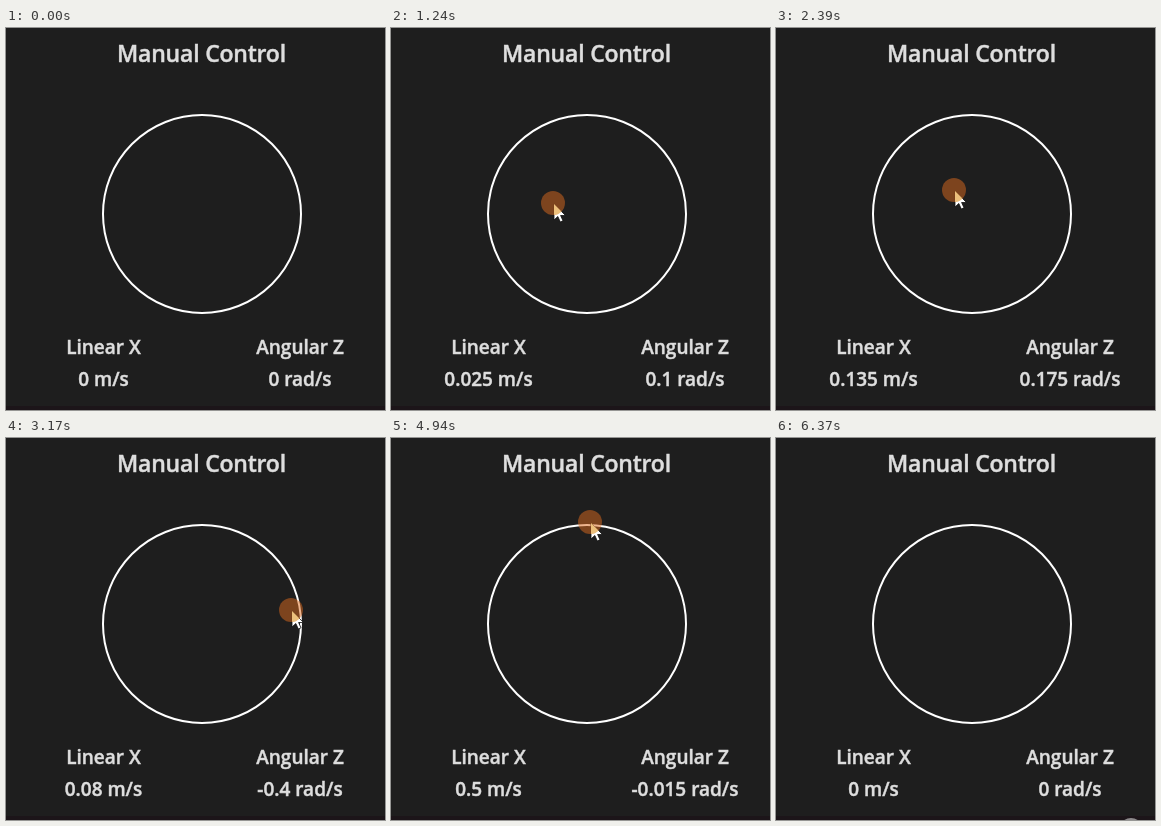
An HTML page for the animation above (6.4 s loop, 379 by 382 pixels).

```html
<!DOCTYPE html>
<html lang="en">
<head>
<meta charset="utf-8">
<title>Manual Control</title>
<style>
  html, body { margin: 0; width: 100%; height: 100%; overflow: hidden; background: #1e1e1e; }
  svg { display: block; }
  text {
    font: 600 19px "Open Sans", "Noto Sans", sans-serif;
    fill: #dedede; stroke: #dedede; stroke-width: .45px; text-anchor: middle;
  }
  .title { font-size: 23px; letter-spacing: -.2px; }
</style>
</head>
<body>
<svg width="379" height="382" viewBox="0 0 379 382">
  <defs>
    <clipPath id="inside"><circle r="12"/></clipPath>
    <path id="arrow" d="M1 1V17L4.8 13.5L7.3 19L10 17.8L7.6 12.5H12.5Z"/>
  </defs>
  <rect y="378" width="379" height="4" fill="#1c1519"/>
  <text class="title" x="195.5" y="34">Manual Control</text>
  <circle cx="196" cy="186" r="99" fill="none" stroke="#fff" stroke-width="2"/>
  <text x="97.5" y="326">Linear X</text>
  <text x="294" y="326">Angular Z</text>
  <text id="linear" x="97.5" y="358"></text>
  <text id="angular" x="294" y="358"></text>
  <g id="pointer">
    <use href="#arrow" fill="#fff" stroke="#111" stroke-width=".8"/>
    <circle id="dot" r="12"/>
    <path id="wedge" d="M0 0L6 -10.4A12 12 0 0 1 -3.1 11.6Z" fill="#7d441e"/>
    <use href="#arrow" fill="#ecc07c" clip-path="url(#inside)"/>
  </g>
</svg>
<script>
const LOOP = 6400, PERIOD = 380;
const CX = 196, CY = 186;
const ENTER = 30, PRESS = 760, RELEASE = 6050;
const PAUSE = 4100, RESUME = 4200;

// Turning points of the pointer: time, x, y
const path = [
  [ENTER, 372, 366], [PRESS, CX, CY], [1140, 176, 181], [1240, 162, 175],
  [1960, 150, 141], [2280, 161, 159], [2390, 178, 162], [3040, 276, 170],
  [3170, 285, 172], [3560, 275, 147], [3800, 282, 173], [PAUSE, 248, 158],
  [RESUME, 248, 158], [4940, 199, 84], [5300, 197, 187], [6000, 197, 286], [6370, 355, 392]
];

const el = id => document.getElementById(id);
const [linear, angular, pointer, dot, wedge] = ["linear", "angular", "pointer", "dot", "wedge"].map(el);
const clamp = (v, lo, hi) => Math.max(lo, Math.min(hi, v));

function position(t) {
  const next = path.findIndex(p => p[0] > t);
  const i = next < 0 ? path.length - 1 : Math.max(1, next);
  const [t0, x0, y0] = path[i - 1], [t1, x1, y1] = path[i];
  const k = clamp((t - t0) / (t1 - t0), 0, 1);
  return [x0 + (x1 - x0) * k, y0 + (y1 - y0) * k];
}

// One pixel is worth 0.005; adding 0 turns -0 into 0
const speed = d => clamp(Math.round(d), -100, 100) / 200 + 0;

function draw(t) {
  const [x, y] = position(t);
  const pressed = t >= PRESS && t < RELEASE;
  const paused = t >= PAUSE && t < RESUME;

  pointer.setAttribute("visibility", t < ENTER ? "hidden" : "visible");
  pointer.setAttribute("transform", `translate(${Math.round(x)} ${Math.round(y)})`);
  dot.setAttribute("fill", paused ? "#b8861f" : pressed ? "rgba(220,106,30,.5)" : "rgba(255,255,255,.5)");
  wedge.setAttribute("display", paused ? "inline" : "none");

  // The readout samples the stick at a fixed rate
  const [sx, sy] = pressed ? position(t - t % PERIOD) : [CX, CY];
  linear.textContent = speed(CY - sy) + " m/s";
  angular.textContent = speed(CX - sx) + " rad/s";
}

const start = performance.now();
function tick() {
  draw((performance.now() - start) % LOOP);
  requestAnimationFrame(tick);
}
tick();
</script>
</body>
</html>
```
